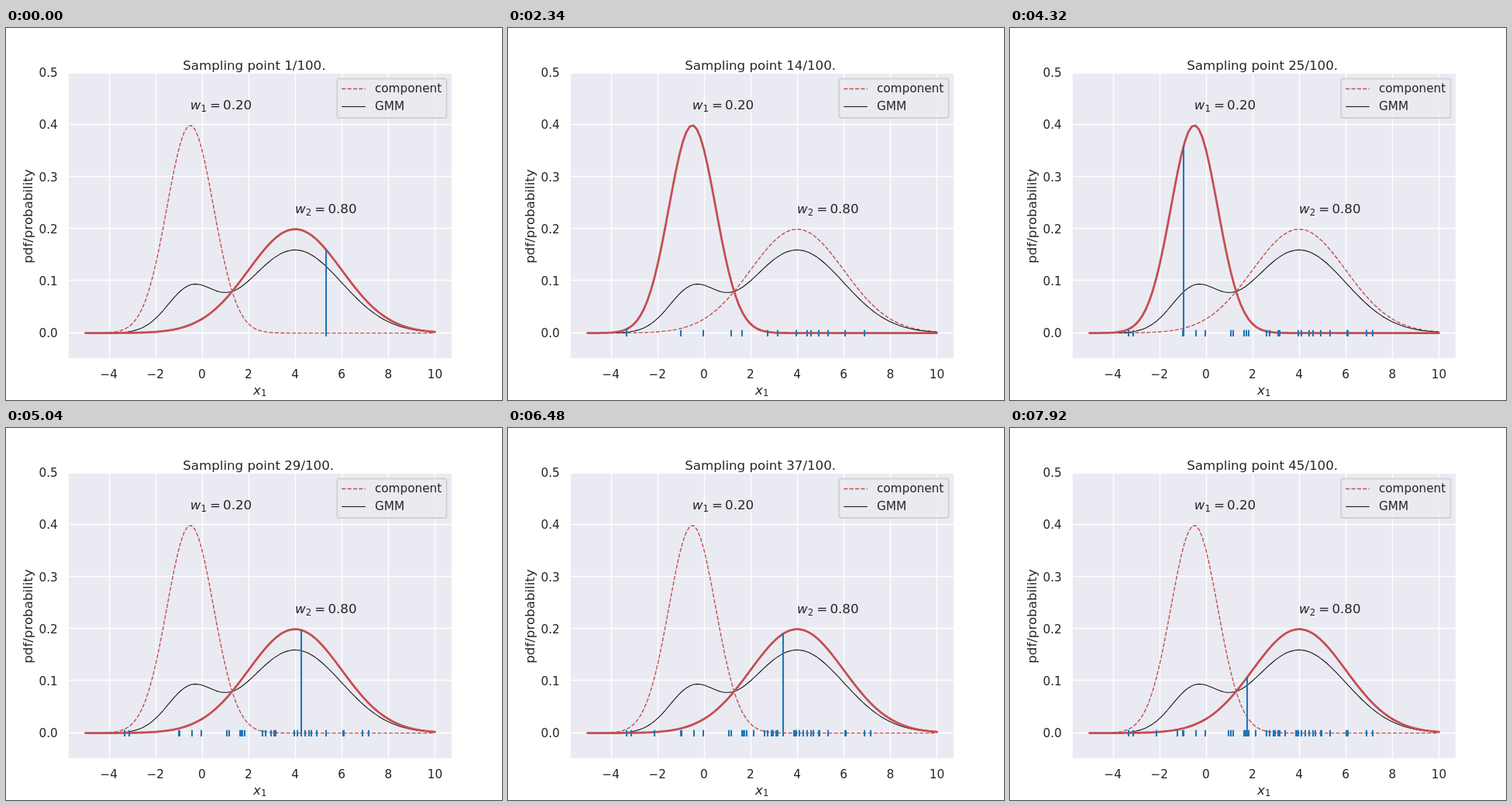
An HTML page for the animation above (8 s loop, 640x480 px).

```html
<!DOCTYPE html>
<html lang="en">
<head>
<meta charset="utf-8">
<title>Sampling from a Gaussian mixture</title>
<style>
  html, body { margin: 0; width: 100%; height: 100%; overflow: hidden; background: #fff; }
  svg { display: block; width: 640px; height: 480px; }
  text { font: 16.667px "DejaVu Sans", sans-serif; fill: #262626; white-space: pre; }
  .small { font-size: 15.278px; }
  .sub { font-size: 11.667px; }
  .var { font-style: oblique; }
  .grid { stroke: #fff; stroke-width: 1.39; }
  .curve { fill: none; stroke: #c44e52; stroke-linejoin: round; }
  .dashed { stroke-width: 1.39; stroke-dasharray: 5.14 2.22; }
  .bold { stroke-width: 2.78; stroke-linecap: round; }
  .mix { stroke: #1a1a1a; stroke-width: 1.11; }
  .blue { fill: none; stroke: #1f77b4; stroke-width: 2.08; }
</style>
</head>
<body>
<svg id="plot" viewBox="0 0 640 480"></svg>
<script>
const STEP = 180, LOOP = 8000;
const X0 = 252.85, XS = 496 / 16.5, Y0 = 393.6, YS = 672;
const px = x => X0 + x * XS;
const py = y => Y0 - y * YS;

const comps = [{ w: 0.2, m: -0.5, s: 1 }, { w: 0.8, m: 4, s: 2 }];
const pdf = (c, x) =>
  Math.exp(-(((x - c.m) / c.s) ** 2) / 2) / (c.s * Math.sqrt(2 * Math.PI));
const mix = x => comps.reduce((sum, c) => sum + c.w * pdf(c, x), 0);

// Sample positions along the axis, in drawing order
const samples = [
  413, 372, 401, 223, 348, 288, 391, 302, 460,
  386, 435, 252, 335, 153, 308, 436, 240, 159, 331,
  305, 376, 468, 346, 285, 224,
  342, 394, 304, 381,
  402, 369, 317, 189, 340, 347, 371, 355,
  434, 216, 370, 307, 341, 282, 436, 306
];
// Samples drawn from the narrow component
const narrow = new Set([223, 153, 240, 159, 224, 189, 216]);

const svg = document.getElementById('plot');
function add(tag, attrs, text) {
  const el = document.createElementNS('http://www.w3.org/2000/svg', tag);
  for (const k in attrs) el.setAttribute(k, attrs[k]);
  if (text !== undefined) el.textContent = text;
  svg.appendChild(el);
  return el;
}
const label = (x, y, text, cls = '', anchor = 'start') =>
  add('text', { x, y, class: cls, 'text-anchor': anchor }, text);
const path = (d, cls) => add('path', { d, class: cls });

function curve(f) {
  const pts = [];
  for (let i = 0; i < 100; i++) {
    const x = -5 + 15 * i / 99;
    pts.push(px(x).toFixed(2) + ' ' + py(f(x)).toFixed(2));
  }
  return 'M' + pts.join('L');
}

// Axes, grid and tick labels
add('rect', { x: 80, y: 57.6, width: 496, height: 369.6, fill: '#eaeaf2' });
for (let v = -4; v <= 10; v += 2) {
  path(`M${Math.round(px(v)) + 0.5} 57.6V427.2`, 'grid');
  label(px(v), 452, String(v).replace('-', '\u2212'), 'small', 'middle');
}
for (let i = 0; i <= 5; i++) {
  const y = py(i / 10);
  path(`M80 ${479.5 - Math.round(480 - y)}H576`, 'grid');
  label(66.8, y + 5.6, (i / 10).toFixed(1), 'small', 'end');
}

// Curves
const shapes = comps.map(c => curve(x => pdf(c, x)));
const thin = path('', 'curve dashed');
path(curve(mix), 'curve mix');
const thick = path('', 'curve bold');
const ticks = path('', 'blue');
const stem = path('', 'blue');
stem.setAttribute('stroke-linecap', 'round');
add('rect', { x: 80, y: 58, width: 496, height: 369, fill: 'none', stroke: '#fff', 'stroke-width': 1.74 });

// Texts
const title = label(228.2, 54, '');
function weight(x, y, n, value) {
  label(x, y, 'w', 'var');
  label(x + 13.7, y + 2.7, n, 'sub');
  label(x + 25.1, y, '=');
  label(x + 42.3, y, value);
}
weight(px(-0.5), 105, '1', '0.20');
weight(px(4), 239.2, '2', '0.80');
label(319, 472.5, 'x', 'var');
label(329, 475.2, '1', 'sub');
label(0, 0, 'pdf/probability', '', 'middle')
  .setAttribute('transform', 'translate(34 243) rotate(-90)');

// Legend
add('rect', {
  x: 427.3, y: 65.4, width: 141.2, height: 50.8, rx: 3,
  fill: '#eaeaf2', 'fill-opacity': 0.8, stroke: '#ccc', 'stroke-opacity': 0.9, 'stroke-width': 1.7
});
path('M433.2 78.5H463.7', 'curve dashed');
path('M433.2 101.5H463.7', 'curve mix');
label(475.9, 83.4, 'component', 'small');
label(475.9, 106.2, 'GMM', 'small');

let shown = -1;
function draw(t) {
  const i = Math.min(Math.floor((t % LOOP) / STEP), samples.length - 1);
  if (i !== shown) {
    shown = i;
    const p = samples[i];
    const k = narrow.has(p) ? 0 : 1;
    const top = py(pdf(comps[k], (p - X0) / XS));
    title.textContent = `Sampling point ${i + 1}/100.`;
    thick.setAttribute('d', shapes[k]);
    thin.setAttribute('d', shapes[1 - k]);
    stem.setAttribute('d', `M${p} ${Y0}V${top.toFixed(2)}`);
    ticks.setAttribute('d', samples.slice(0, i + 1).map(x => `M${x} 389.8V397.9`).join(''));
  }
}

const start = performance.now();
function loop() {
  draw(performance.now() - start);
  requestAnimationFrame(loop);
}
loop();
</script>
</body>
</html>
```
